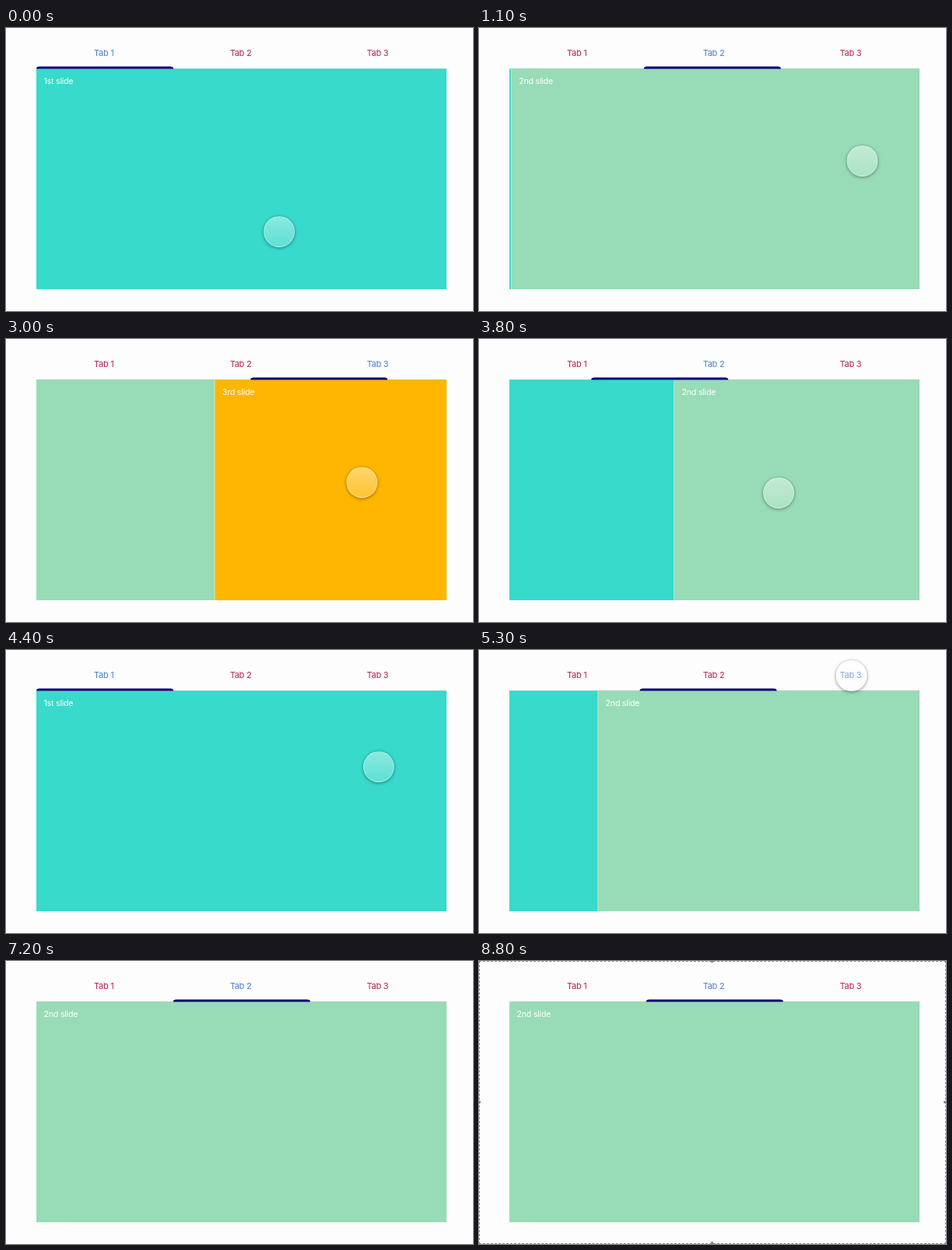
An HTML page for the animation above (9000 ms loop, 600x364 px).

```html
<!DOCTYPE html>
<html lang="en">
<head>
<meta charset="utf-8">
<title>Swipeable tabs</title>
<style>
  html, body { margin: 0; width: 100%; height: 100%; overflow: hidden; background: #fefdfe; }
  #stage {
    position: relative; width: 600px; height: 364px; overflow: hidden;
    font: 10.7px/16px Inter, "Open Sans", sans-serif; letter-spacing: -.25px;
  }
  #stage div { position: absolute; box-sizing: border-box; }
  .tab { top: 24px; width: 175.8px; font-size: 11px; text-align: center; color: #b9204a; }
  #stage .active { color: #4a7ec8; }
  #view { left: 39px; top: 52px; width: 527px; height: 283.5px; overflow: hidden; }
  .slide { width: 100%; height: 100%; padding: 8.5px 9.5px; color: #fff; }
  #line { left: 39px; top: 52px; width: 527px; height: 1px; background: rgba(190,195,195,.6); }
  #ink {
    left: 39px; top: 49px; width: 175.8px; height: 3px;
    background: #000078; border-radius: 4px 4px 0 0 / 2.5px 2.5px 0 0;
  }
  #cursor {
    left: -20px; top: -20px; width: 40px; height: 40px; border-radius: 50%;
    background: linear-gradient(rgba(255,255,255,.42), rgba(255,255,255,.2));
    border: 1px solid rgba(255,255,255,.35);
    box-shadow: 0 1px 4px rgba(0,0,0,.4), 0 0 1px rgba(0,0,0,.25);
  }
  #frame { inset: 0; border: 1px dashed #8a8a8a; }
  #frame div { width: 3px; height: 3px; margin: -2px; background: #888; }
</style>
</head>
<body>
<div id="stage">
  <div class="tab">Tab 1</div><div class="tab">Tab 2</div><div class="tab">Tab 3</div>
  <div id="view">
    <div class="slide" style="background:#37dacb">1st slide</div>
    <div class="slide" style="background:#97dcb6">2nd slide</div>
    <div class="slide" style="background:#ffb600">3rd slide</div>
  </div>
  <div id="line"></div>
  <div id="ink"></div>
  <div id="cursor"></div>
  <div id="frame">
    <div style="left:50%;top:0"></div><div style="left:50%;top:100%"></div>
    <div style="left:0;top:50%"></div><div style="left:100%;top:50%"></div>
  </div>
</div>
<script>
const LOOP = 9000, STEP = 100, WIDTH = 527.5, TAB = WIDTH / 3, SETTLE = 400;
const $ = id => document.getElementById(id);
const tabs = [...document.querySelectorAll('.tab')];
const slides = [...document.querySelectorAll('.slide')];
tabs.forEach((tab, i) => tab.style.left = 37.8 + i * TAB + 'px');

// A tap is a drag with no length. `to` is the slide it settles on.
const gestures = [
  { press: 0, release: 745, x: 351, y: 262, dx: -161, to: 1 },
  { press: 1250, release: 1800, x: 492.5, y: 171, dx: -242, to: 2 },
  { press: 2500, release: 3140, x: 228, y: 184.5, dx: 261.4, to: 1 },
  { press: 3560, release: 3940, x: 173, y: 198, dx: 306, to: 0 },
  { press: 5203, release: 5203, x: 478.5, y: 33, dx: 0, to: 2 },
  { press: 6351, release: 6351, x: 296.8, y: 34.5, dx: 0, to: 1 }
];

const clamp = v => Math.min(1, Math.max(0, v));
const mix = (a, b, p) => a + (b - a) * p;
const progress = (t, from, to) => clamp((t - from) / (to - from || 1));
const smooth = p => p * p * (3 - 2 * p);
const easeOut = p => 1 - (1 - p) ** 3;

// cubic-bezier(.25, .1, .25, 1)
function ease(x) {
  let lo = 0, hi = 1;
  for (let i = 0; i < 24; i++) {
    const u = (lo + hi) / 2;
    if (.75 * u * (1 - u) + u ** 3 < x) lo = u; else hi = u;
  }
  return .3 * lo * (1 - lo) ** 2 + 3 * lo * lo * (1 - lo) + lo ** 3;
}

function state(t) {
  const n = gestures.findLastIndex(g => t >= g.press);
  const g = gestures[n], next = gestures[n + 1] || g;
  const before = n ? gestures[n - 1].to : 0;
  const dx = g.dx * smooth(progress(t, g.press, g.release));
  const dragged = before - dx / WIDTH;
  const settle = t - g.release;
  // After release the pointer travels to where the next gesture begins.
  const travel = next === g ? 0 : smooth(progress(t, g.release + 100, next.press - 150));
  return {
    slide: mix(dragged, g.to, ease(clamp(settle / SETTLE))),
    ink: mix(dragged, g.to, easeOut(clamp(settle / SETTLE / 1.25))),
    active: settle < 0 ? before : g.to,
    x: mix(g.x + dx, next.x, travel),
    y: mix(g.y, next.y, travel)
  };
}

function draw(now) {
  const t = Math.floor(now % LOOP / STEP) * STEP;
  const { slide, ink, active, x, y } = state(t);
  slides.forEach((s, i) => s.style.transform = `translateX(${(i - slide) * WIDTH}px)`);
  tabs.forEach((tab, i) => tab.classList.toggle('active', i === active));
  $('ink').style.transform = `translate(${ink * TAB}px, .4px)`;
  $('cursor').style.transform = `translate(${x}px, ${y}px)`;
  $('cursor').style.opacity = 1 - progress(t, 6900, 7200);
  $('frame').style.display = t < 8000 ? 'none' : 'block';
}

const start = performance.now();
function tick() {
  draw(performance.now() - start);
  requestAnimationFrame(tick);
}
tick();
</script>
</body>
</html>
```
